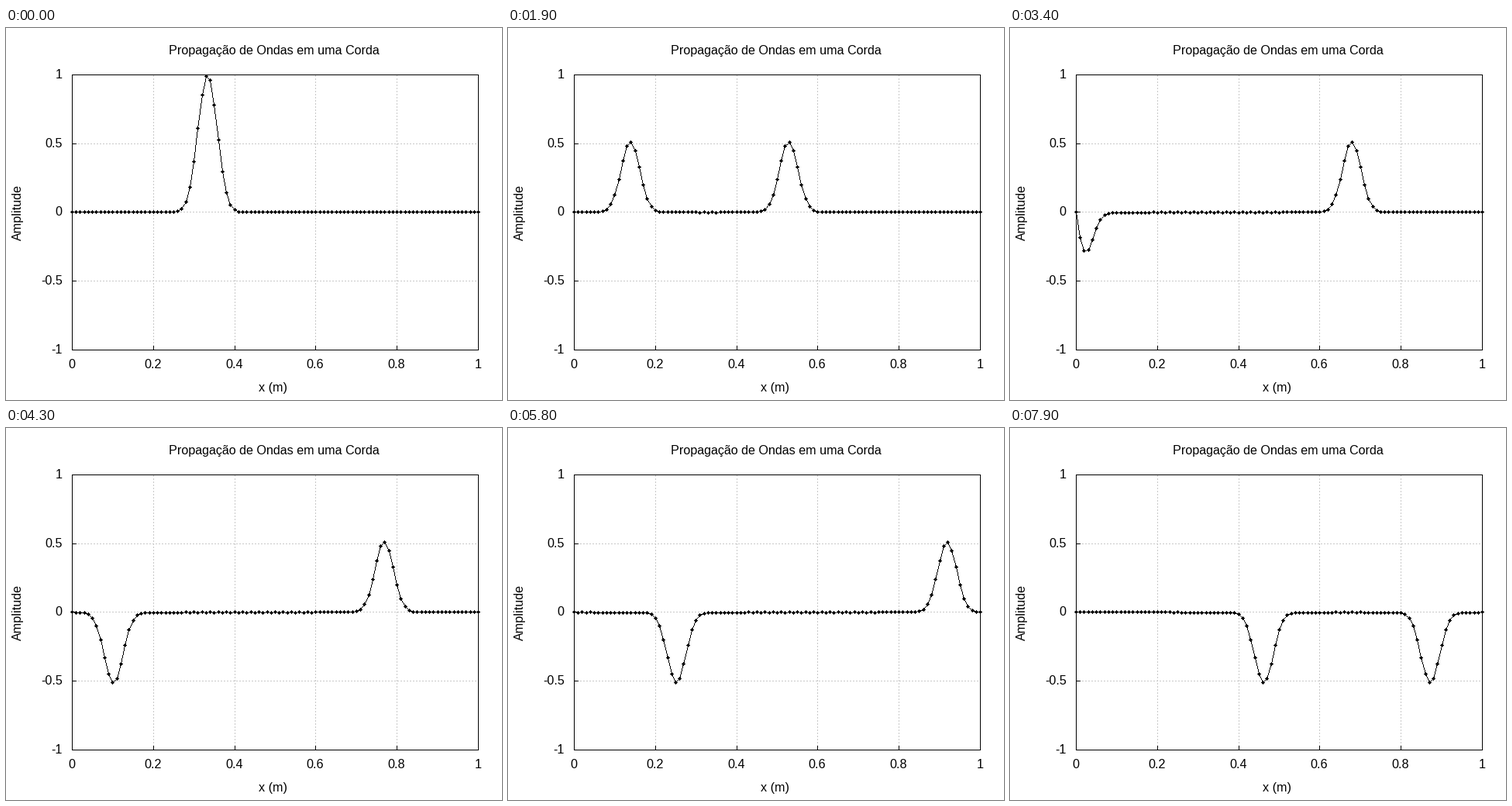
Animation of 640 by 480 pixels, one loop 8 s. Source, as a matplotlib script:

```python
import numpy as np
import matplotlib.pyplot as plt
from matplotlib.animation import FuncAnimation
from matplotlib.collections import PolyCollection

W, H, DPI = 640, 480, 100
PX = 72 / DPI                       # one pixel in points
LEFT, RIGHT, TOP, BOTTOM = 85, 609, 60, 415
FRAMES, STEP_MS, CELLS = 80, 100, 100
TICK, GRID = 5, "#c8c8c8"

plt.rcParams.update({
    "font.family": "Liberation Sans",
    "font.size": 16.15 * PX,
    "text.hinting": "force_autohint",
    "text.hinting_factor": 8,
    "path.simplify": False,
})


def to_px(x, y):
    """Data to whole pixels, returned as pixel centres."""
    px = LEFT + np.floor(np.asarray(x) * (RIGHT - LEFT) + 0.5)
    py = BOTTOM - np.floor((np.asarray(y) + 1) * (BOTTOM - TOP) / 2 + 0.5)
    return px + 0.5, py + 0.5


def simulate():
    """String with fixed ends, leapfrog scheme at Courant number 1."""
    x = np.arange(CELLS + 1) / CELLS
    prev = np.exp(-(30 * (x - 1 / 3)) ** 2)
    prev[[0, -1]] = 0
    cur = prev.copy()
    states = []
    for _ in range(FRAMES):
        states.append(cur)
        new = np.zeros_like(cur)
        new[1:-1] = cur[2:] + cur[:-2] - prev[1:-1]
        prev, cur = cur, new
    return x, states


def trace(pts):
    """Pixel centres of a one-pixel polyline without smoothing."""
    parts = []
    for a, b in zip(pts[:-1], pts[1:]):
        n = int(np.abs(b - a).max())
        t = np.linspace(0, 1, n + 1)[:, None]
        parts.append(np.floor(a + (b - a) * t) + 0.5)
    return np.vstack(parts)


fig = plt.figure(figsize=(W / DPI, H / DPI), dpi=DPI, facecolor="white")
ax = fig.add_axes([0, 0, 1, 1])
ax.set(xlim=(0, W), ylim=(H, 0))
ax.axis("off")


def stroke(xs, ys, color="black", **kw):
    ax.plot(xs, ys, color=color, lw=PX, snap=False,
            solid_capstyle="butt", dash_capstyle="butt", **kw)


def label(x, y, text, ha="center", **kw):
    ax.text(x, y, text, ha=ha, va="baseline", **kw)


def stamps(zorder):
    """Hard-edged black shapes; any touched pixel is filled."""
    shapes = PolyCollection([], facecolors="black", edgecolors="none",
                            linewidths=0, antialiaseds=False, zorder=zorder)
    shapes.set_snap(False)
    return ax.add_collection(shapes, autolim=False)


for v in np.linspace(0, 1, 6):
    tx = float(to_px(v, 0)[0])
    if 0 < v < 1:
        stroke([tx, tx], [BOTTOM, TOP], GRID, dashes=(2, 2), zorder=1)
        stroke([tx, tx], [BOTTOM, BOTTOM - TICK], zorder=2)
    label(tx - 0.5, 439, f"{v:.1g}")

for v in np.linspace(-1, 1, 5):
    ty = float(to_px(0, v)[1])
    if abs(v) < 1:
        stroke([LEFT, RIGHT], [ty, ty], GRID, dashes=(2, 2), zorder=1)
        stroke([LEFT, LEFT + TICK + 1], [ty, ty], zorder=2)
    label(72.5, ty + 4.5, f"{v:g}", ha="right")

x0, x1, y0, y1 = LEFT + 0.5, RIGHT + 0.5, TOP + 0.5, BOTTOM + 0.5
for y in (y0, y1):
    stroke([LEFT, RIGHT + 1], [y, y], zorder=4)
for x in (x0, x1):
    stroke([x, x], [TOP, BOTTOM + 1], zorder=4)

label(346, 34, "Propagação de Ondas em uma Corda")
label(345, 469, "x (m)")
label(20, 237.5, "Amplitude", rotation=90, rotation_mode="anchor")

grid_x, states = simulate()
DIAMOND = 1.9 * np.array([(0, -1), (1, 0), (0, 1), (-1, 0)])
SQUARE = 0.4 * np.array([(-1, -1), (1, -1), (1, 1), (-1, 1)])
curve, dots = stamps(3), stamps(5)


def draw(i):
    pts = np.column_stack(to_px(grid_x, states[i]))
    curve.set_verts(trace(pts)[:, None] + SQUARE)
    dots.set_verts(pts[:, None] + DIAMOND)
    return curve, dots


anim = FuncAnimation(fig, draw, frames=FRAMES, interval=STEP_MS,
                     repeat=True, repeat_delay=0)
plt.show()
```
